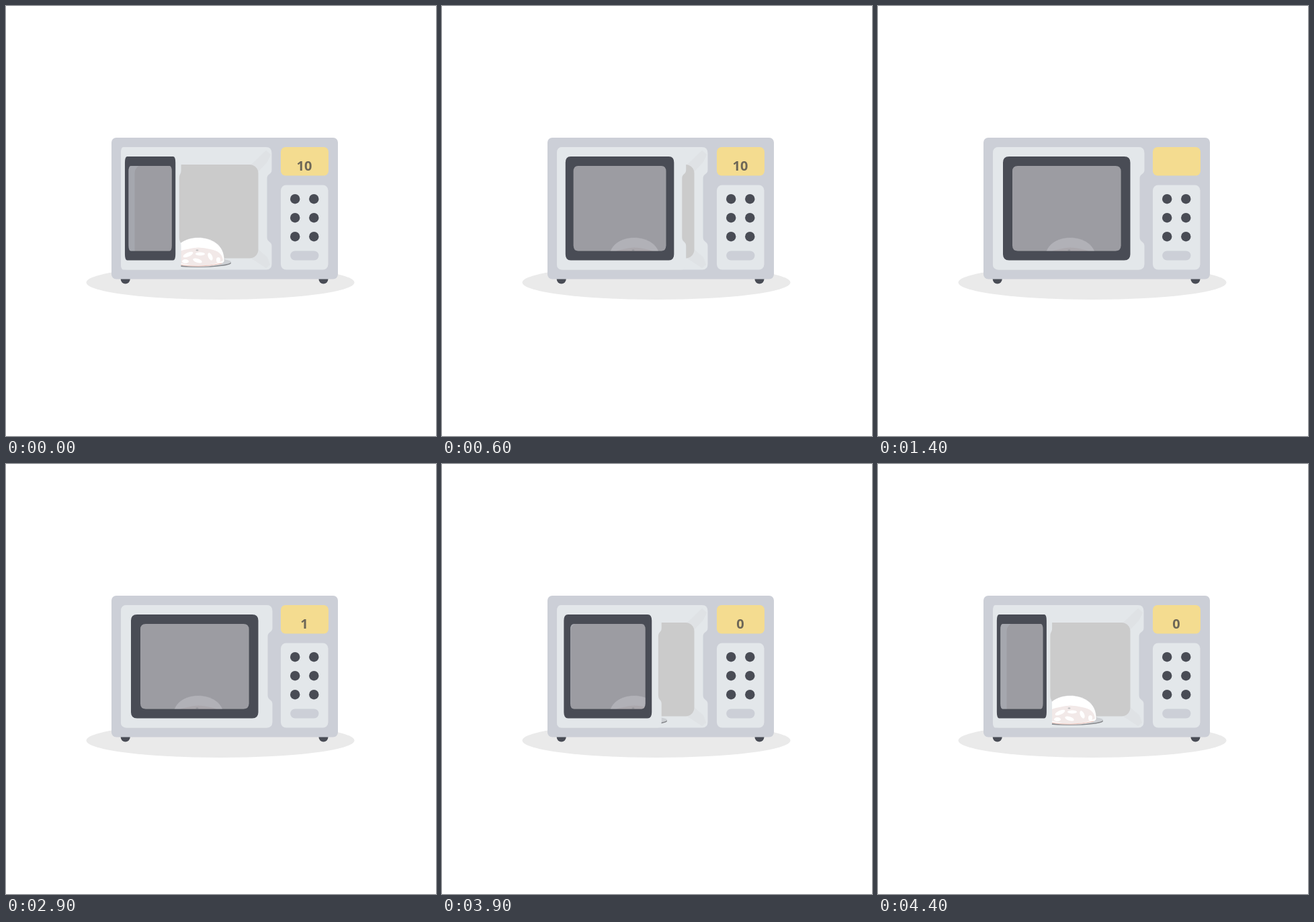
An HTML page that plays this animation: 640 by 640 pixels, repeating every 5600 ms.

```html
<!DOCTYPE html>
<html lang="en">
<head>
<meta charset="utf-8">
<title>Microwave</title>
<style>
  html, body { margin: 0; width: 100%; height: 100%; overflow: hidden; background: #fff; }
  svg { display: block; width: 100%; height: 100%; }
  text { font: 700 20px "Open Sans", "Noto Sans", sans-serif; text-anchor: middle; fill: #6d6757; }
  .body { fill: #cccfd7; }
  .panel { fill: #e3e7ea; }
  .dark { fill: #494c55; }
</style>
</head>
<body>
<svg viewBox="0 0 640 640">
  <ellipse cx="319" cy="411.5" rx="199.5" ry="25.5" fill="#eaeaea"/>
  <g class="dark">
    <circle cx="177.7" cy="406.5" r="7"/>
    <circle cx="472.5" cy="406.5" r="7"/>
  </g>
  <rect class="body" x="157" y="196" width="337" height="210.5" rx="7"/>

  <!-- cavity -->
  <path class="panel" transform="translate(171) scale(.9955 1)" d="M9 210H217Q225.500 210 225.500 219V244C225.500 251 218.500 249 218.500 257V344C218.500 352 225.500 350 225.500 357V384Q225.500 392.500 217 392.500H9Q0 392.500 0 384V219Q0 210 9 210Z"/>
  <path fill="#dfe2e5" d="M364 237L387 215L394 221L389 232L375 247ZM364 375L387 390L393 385L389 374L375 362Z"/>
  <rect x="191.500" y="236" width="184" height="139.500" rx="13" fill="#cbcbcb"/>

  <!-- covered plate -->
  <ellipse cx="286" cy="382.500" rx="49" ry="6.500" fill="#85878b"/>
  <ellipse cx="286" cy="381" rx="49" ry="6.300" fill="#cdd0d4"/>
  <path fill="#fff" stroke="#c4c4c6" stroke-width=".6" d="M248 380C247 354 268 344.500 286 344.500S326 354 325 380Q322 387 286 388Q250 387 248 380Z"/>
  <g fill="#f2e9e8">
    <path d="M250 378Q252 364 270 362Q286 357 304 362Q322 365 323 379Q310 386 286 387Q262 386 250 378Z"/>
    <g fill="#fff">
      <ellipse cx="271" cy="370" rx="8" ry="3" transform="rotate(-24 271 370)"/>
      <ellipse cx="289" cy="369" rx="7" ry="2.500"/>
      <ellipse cx="304" cy="373" rx="3" ry="6" transform="rotate(-24 304 373)"/>
      <ellipse cx="267" cy="380" rx="5" ry="3"/>
      <ellipse cx="285" cy="379" rx="7" ry="3" transform="rotate(18 285 379)"/>
      <ellipse cx="316" cy="378" rx="3" ry="4"/>
    </g>
  </g>
  <path d="M252 384Q286 391 321 383" fill="none" stroke="#e6b3a8" stroke-width=".8"/>
  <ellipse cx="284.500" cy="363.500" rx="2" ry="1" fill="#bbb"/>

  <!-- door, hinged on its left edge -->
  <g id="door">
    <path class="panel" fill-rule="evenodd" d="M9 210H217Q225.500 210 225.500 219V244C225.500 251 218.500 249 218.500 257V344C218.500 352 225.500 350 225.500 357V384Q225.500 392.500 217 392.500H9Q0 392.500 0 384V219Q0 210 9 210ZM22 230V372H197V230Z"/>
    <rect x="29" y="238" width="161.500" height="126.500" fill="#7e7e87" opacity=".6"/>
    <path class="dark" fill-rule="evenodd" d="M24 224H195.500Q204.500 224 204.500 233V369.500Q204.500 378.500 195.500 378.500H24Q15 378.500 15 369.500V233Q15 224 24 224ZM37 238Q29 238 29 246V356.500Q29 364.500 37 364.500H182.500Q190.500 364.500 190.500 356.500V246Q190.500 238 182.500 238Z"/>
  </g>

  <!-- controls -->
  <rect x="409" y="210" width="71" height="42.500" rx="7" fill="#f4dc90"/>
  <text id="count" x="444" y="244.700"></text>
  <rect class="panel" x="409" y="266.500" width="70.500" height="126" rx="8"/>
  <g class="dark">
    <circle cx="430.200" cy="287.200" r="7.200"/><circle cx="458.300" cy="287.200" r="7.200"/>
    <circle cx="430.200" cy="315.200" r="7.200"/><circle cx="458.300" cy="315.200" r="7.200"/>
    <circle cx="430.200" cy="343.200" r="7.200"/><circle cx="458.300" cy="343.200" r="7.200"/>
  </g>
  <rect class="body" x="423.200" y="364.500" width="42.300" height="14" rx="7"/>
</svg>
<script>
  const LOOP = 5600, STEP = 100, SWING = 1280, OPEN = 67 * Math.PI / 180;
  const door = document.getElementById("door");
  const count = document.getElementById("count");

  // Eased progress of a door swing that begins at the given time
  function swing(t, start) {
    const p = Math.min(1, Math.max(0, (t - start) / SWING));
    return (1 - Math.cos(Math.PI * p)) / 2;
  }

  function draw(now) {
    const t = Math.floor(now % LOOP / STEP) * STEP;
    const angle = OPEN * (1 - swing(t, -64) + swing(t, 3100));
    door.setAttribute("transform", `translate(171) scale(${Math.cos(angle)} 1)`);
    count.textContent = t < 1400 ? "10" : t < 2900 ? "" : t < 3100 ? "1" : "0";
  }

  const start = performance.now();
  function tick() {
    draw(performance.now() - start);
    requestAnimationFrame(tick);
  }
  tick();
</script>
</body>
</html>
```
